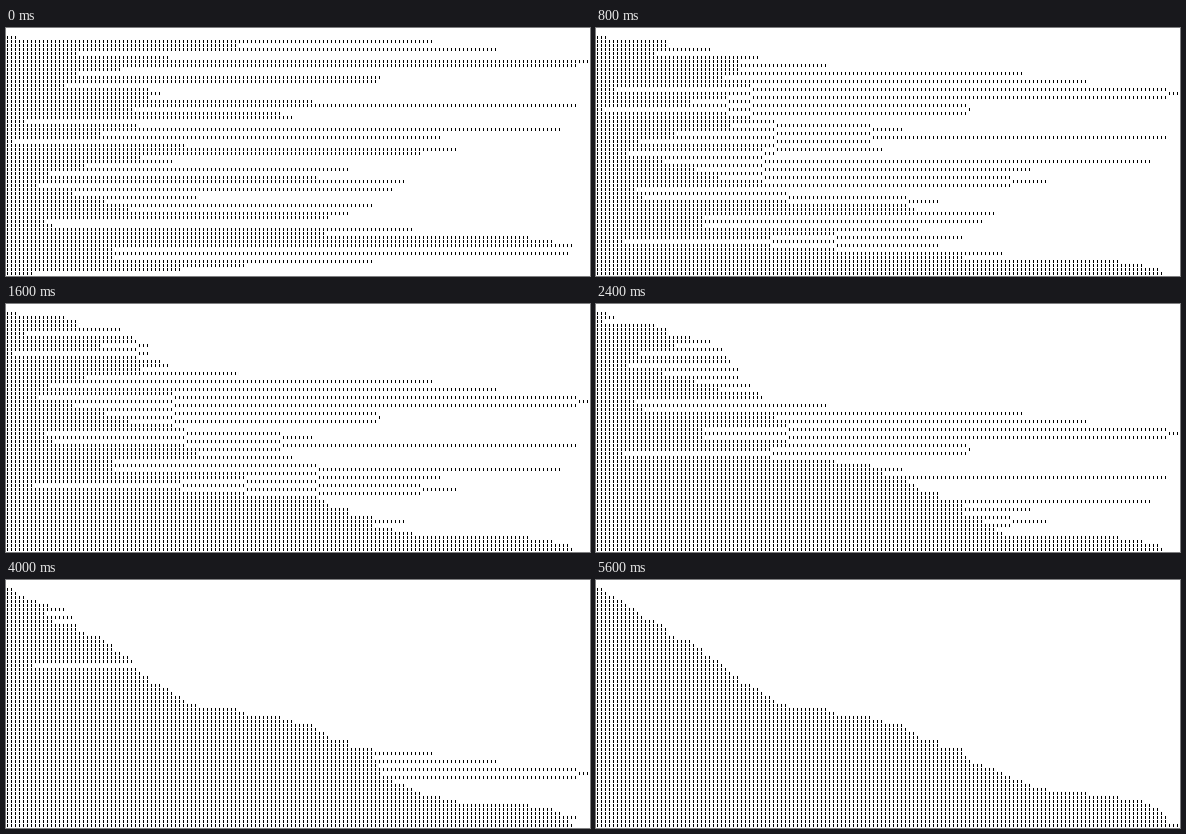
An HTML page for the animation above (10000 ms loop, 584 by 248 pixels).

```html
<!DOCTYPE html>
<html lang="en">
<head>
<meta charset="utf-8">
<title>Bead sort</title>
<style>
  html, body { margin: 0; width: 100%; height: 100%; overflow: hidden; background: #fff; }
  svg { display: block; }
</style>
</head>
<body>
<svg width="584" height="248" viewBox="0 0 584 248" shape-rendering="crispEdges">
  <path id="beads" fill="#000"/>
</svg>
<script>
const LOOP = 10000, STEP = 100, LAST_STEP = 56;
const PITCH = 4, LEFT = 1, TOP = 8;

const lengths = [
  3, 107, 58, 123, 18, 41, 146, 143, 29, 18, 94, 93, 15, 36, 39,
  36, 77, 143, 32, 69, 72, 5, 33, 139, 24, 109, 2, 45, 113, 104,
  34, 42, 20, 86, 11, 78, 100, 8, 97, 17, 48, 25, 92, 31, 86,
  81, 10, 12, 102, 80, 131, 137, 142, 27, 141, 27, 92, 60, 44, 7
];
const columns = Math.max(...lengths);

// A bead drops one row per step if the cell below was empty before the step.
function drop(grid) {
  const next = grid.map(row => row.slice());
  for (let r = 0; r < grid.length - 1; r++) {
    for (let c = 0; c < columns; c++) {
      if (grid[r][c] && !grid[r + 1][c]) {
        next[r][c] = false;
        next[r + 1][c] = true;
      }
    }
  }
  return next;
}

function outline(grid) {
  let d = '';
  grid.forEach((row, r) => row.forEach((bead, c) => {
    if (bead) d += `M${LEFT + c * PITCH} ${TOP + r * PITCH}h1v3h-1z`;
  }));
  return d;
}

const paths = [];
let grid = lengths.map(n => Array.from({ length: columns }, (_, c) => c < n));
for (let i = 0; i <= LAST_STEP; i++) {
  paths.push(outline(grid));
  grid = drop(grid);
}

const beads = document.getElementById('beads');
let shown = -1;

function render(time) {
  const step = Math.min(LAST_STEP, Math.floor((time % LOOP) / STEP));
  if (step === shown) return;
  shown = step;
  beads.setAttribute('d', paths[step]);
}

function tick() {
  render(performance.now() - start);
  requestAnimationFrame(tick);
}

const start = performance.now();
render(0);
requestAnimationFrame(tick);
</script>
</body>
</html>
```
